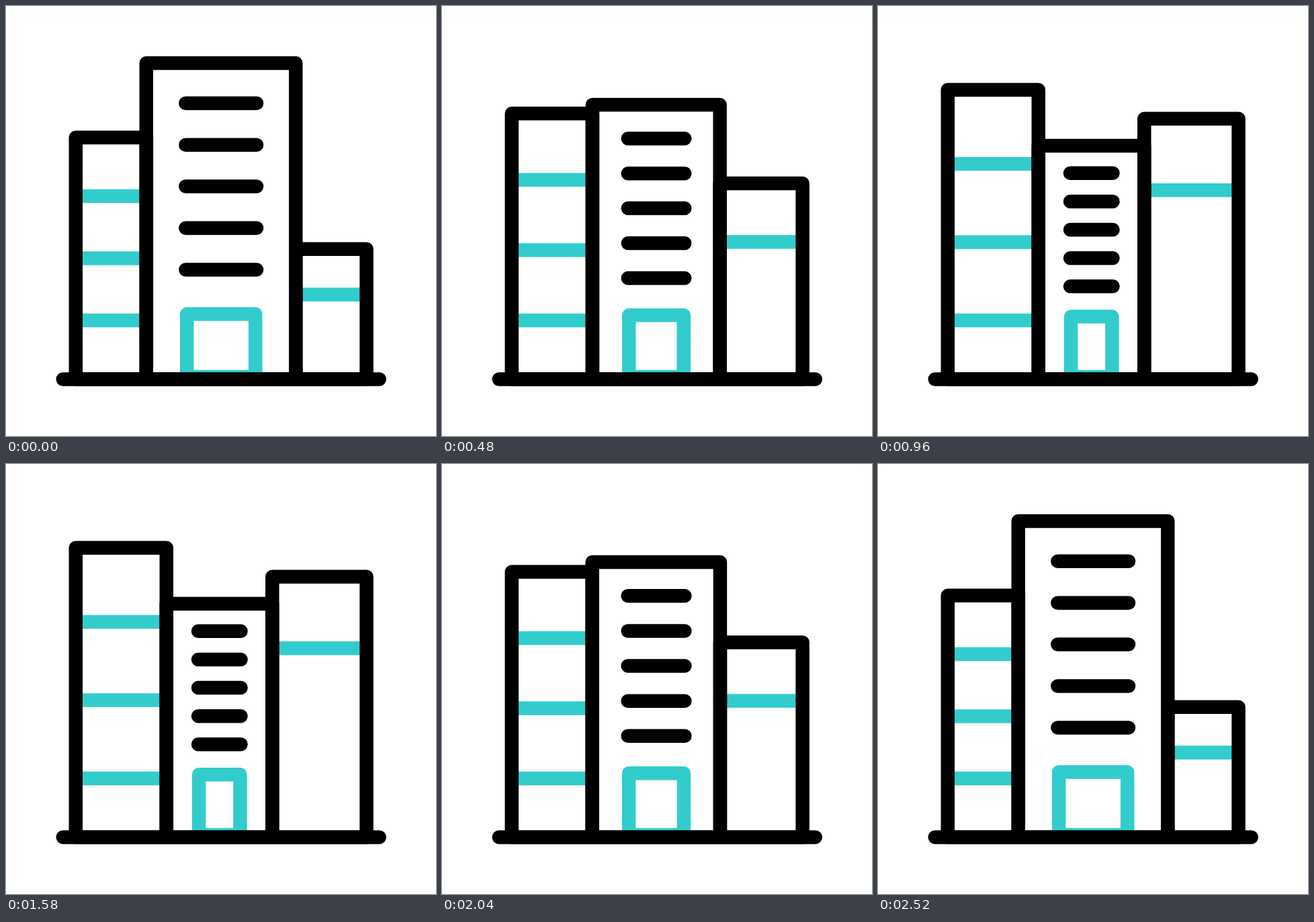
An HTML page that plays this animation: 640 by 640 pixels, repeating every 3600 ms.

```html
<!DOCTYPE html>
<html lang="en">
<head>
<meta charset="utf-8">
<title>Buildings</title>
<style>
  @property --p { syntax: "<number>"; inherits: true; initial-value: 0; }

  html, body { margin: 0; height: 100%; overflow: hidden; background: #fff; }

  /* --p blends between the tall-centre (0) and low-centre (1) skylines */
  svg {
    display: block; width: 100%; height: 100%;
    --left: calc(208.8px + 30px * var(--p));
    --right: calc(431.3px - 35px * var(--p));
    animation: skyline 3600ms infinite;
  }
  @keyframes skyline {
    0% { --p: 0; animation-timing-function: cubic-bezier(.75, 0, .25, 1); }
    26.6667% { --p: 1; animation-timing-function: linear; }
    43.3333% { --p: 1; animation-timing-function: cubic-bezier(.75, 0, .25, 1); }
    70%, 100% { --p: 0; }
  }

  .frame { fill: none; stroke: #000; stroke-width: 20.5px; stroke-linejoin: round; }
  .frame, .door { y: var(--top); height: calc(555.4px - var(--top)); }
  .west {
    --top: calc(195.7px - 70.9px * var(--p));
    x: 103.8px; width: calc(var(--left) - 103.8px);
  }
  .tower {
    --top: calc(85px + 123px * var(--p));
    x: var(--left); width: calc(var(--right) - var(--left));
  }
  .east {
    --top: calc(361.8px - 194px * var(--p));
    x: var(--right); width: calc(536.6px - var(--right));
  }
  .door {
    --top: calc(458.5px + 3.7px * var(--p));
    x: calc(269.2px + 17.9px * var(--p));
    width: calc(102px - 40.7px * var(--p));
    height: calc(552px - var(--top));
    fill: none; stroke: #3cc; stroke-width: 20.5px; stroke-linejoin: round;
  }

  /* --y is the centre at rest, --dy its travel */
  .floor, .window {
    y: calc((var(--y) + var(--dy) * var(--p) - 10.25) * 1px);
    height: 20.5px;
  }
  .floor { fill: #3cc; }
  .floor.w { x: 103.8px; width: calc(var(--left) - 103.8px); }
  .floor.e { x: var(--right); width: calc(536.6px - var(--right)); }
  .window {
    --y: calc(144.8 + 61.9 * var(--i));
    --dy: calc(104 - 19.77 * var(--i));
    x: calc(257.1px + 18.7px * var(--p));
    width: calc(126.2px - 42.2px * var(--p));
    rx: 10.25px;
  }
</style>
</head>
<body>
<svg viewBox="0 0 640 640">
  <rect class="floor w" style="--y:283;--dy:-48"/>
  <rect class="floor w" style="--y:375.5;--dy:-24"/>
  <rect class="floor w" style="--y:468;--dy:0"/>
  <rect class="floor e" style="--y:429.5;--dy:-155.3"/>
  <rect class="door"/>
  <rect class="frame west"/>
  <rect class="frame east"/>
  <rect class="frame tower"/>
  <rect class="window" style="--i:0"/>
  <rect class="window" style="--i:1"/>
  <rect class="window" style="--i:2"/>
  <rect class="window" style="--i:3"/>
  <rect class="window" style="--i:4"/>
  <rect x="74.5" y="545.15" width="491.5" height="20.5" rx="10.25"/>
</svg>
</body>
</html>
```
